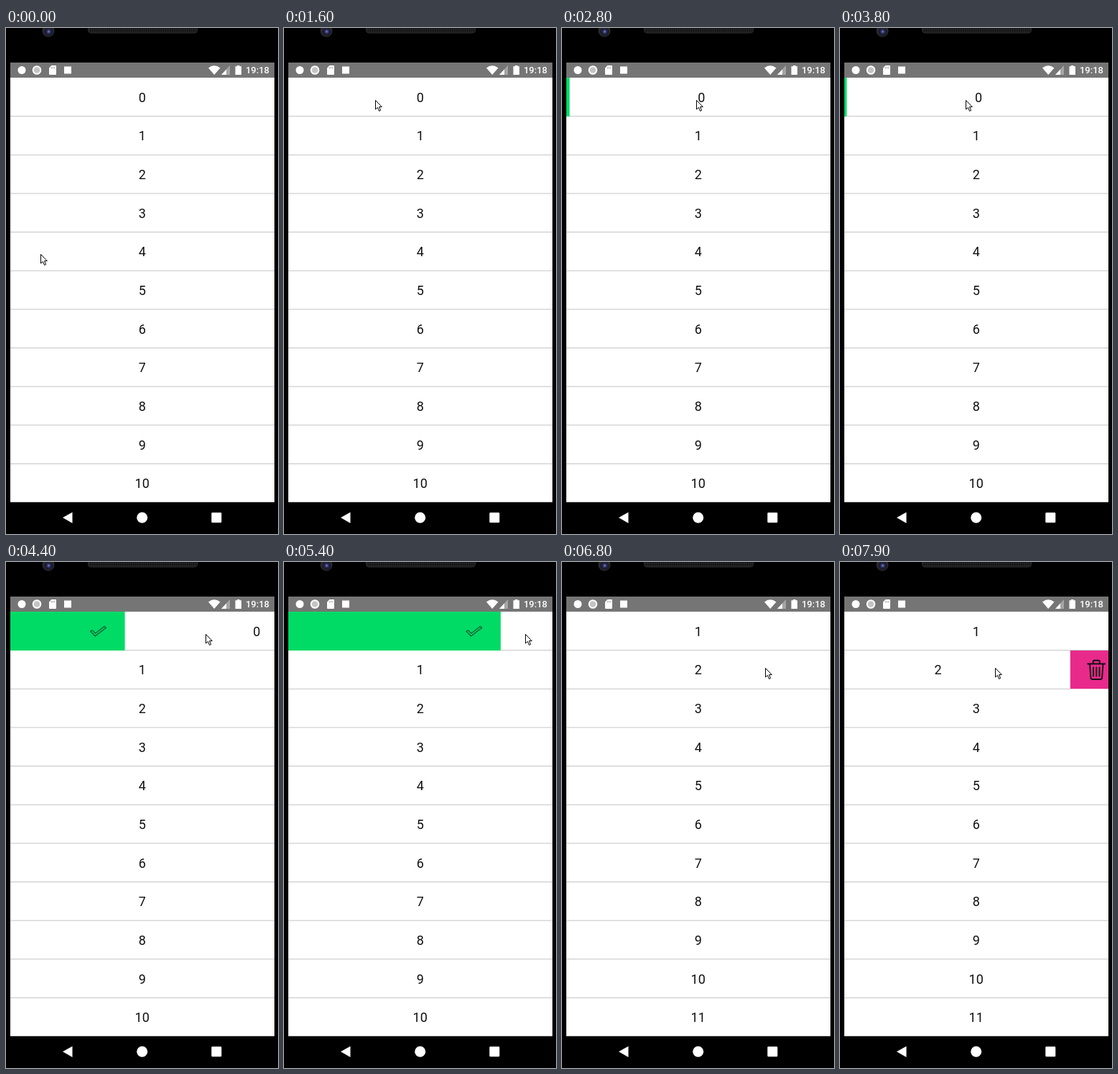
These frames come from a looping animation (379x703 px, 8 s). An HTML page:

```html
<!DOCTYPE html>
<html lang="en">
<head>
<meta charset="utf-8">
<title>Swipe list</title>
<style>
  html, body { margin: 0; width: 100%; height: 100%; overflow: hidden; background: #000; }
  svg { display: block; width: 379px; height: 703px; }
  text { font-family: Roboto, Arial, sans-serif; }
  .row text { font-size: 18px; text-anchor: middle; fill: #111; }
  .clock { font-size: 13px; font-weight: 500; fill: #fff; text-anchor: end; }
</style>
</head>
<body>
<svg viewBox="0 0 379 703">
  <defs>
    <clipPath id="screen"><rect x="6" y="69" width="368" height="589.7"/></clipPath>
    <pattern id="mesh" width="3" height="3" patternUnits="userSpaceOnUse">
      <rect width="3" height="3" fill="#222"/>
      <rect width="1.5" height="1.5" fill="#0a0a0a"/>
    </pattern>
    <radialGradient id="lens">
      <stop offset="0" stop-color="#8088d4"/>
      <stop offset=".4" stop-color="#2a2c5c"/>
      <stop offset="1" stop-color="#121218"/>
    </radialGradient>
  </defs>

  <rect width="379" height="703"/>
  <circle cx="59" cy="4" r="8.5" fill="#2a2a2d"/>
  <circle cx="59.5" cy="5" r="6" fill="url(#lens)"/>
  <rect x="114.5" y="-6" width="152" height="13" rx="4" fill="url(#mesh)" stroke="#2c2c2c"/>

  <rect x="6" y="48" width="368" height="21" fill="#757575"/>
  <g fill="#fff">
    <circle cx="22" cy="58.5" r="5.5"/>
    <circle cx="43" cy="58.5" r="5.3" fill="#c4c4c4" stroke="#fff" stroke-width="2"/>
    <path d="M63.5 52H69a1 1 0 0 1 1 1V64a1 1 0 0 1-1 1H61a1 1 0 0 1-1-1V55.5Z"/>
    <path d="M63.5 54v2.5M65.5 54v2.5M67.5 54v2.5" stroke="#999" stroke-width=".8"/>
    <rect x="81" y="53.5" width="10" height="10"/>
    <path d="M282 55.5Q290 49 298.5 55.5L290.2 65Z"/>
    <path d="M312 52V65H300Z" fill="#a5a5a5"/>
    <path d="M307 57.5V65H300Z"/>
    <path d="M322 52h3.5v1.3H328V65H319.5V53.3H322Z"/>
  </g>
  <text class="clock" x="367" y="63">19:18</text>

  <g clip-path="url(#screen)">
    <rect x="6" y="69" width="368" height="590" fill="#fff"/>
    <g id="list"></g>
    <g id="done">
      <rect x="-362" y="69" width="368" height="54" fill="#00db66"/>
      <path d="M-41.8 96.3l2.6-1.5 4.1 4.3 12.8-9.8 2.2 2-15.3 11.7Z"
            fill="none" stroke="#064f29" stroke-width="1.1" stroke-linejoin="round"/>
    </g>
    <g id="trash">
      <rect x="374" y="123" width="368" height="53.2" fill="#e82a8b"/>
      <g fill="none" stroke="#111" stroke-width="1.9" stroke-linecap="round">
        <path d="M398.5 141.5h24M406 141v-2.5q0-1.7 1.7-1.7h5.6q1.7 0 1.7 1.7v2.5"/>
        <path d="M401.3 142l1.3 18.5q.2 2.5 2.7 2.5h10.4q2.500 0 2.7-2.5l1.3-18.5"/>
        <path d="M406.3 146.5v12M410.5 146.5v12M414.7 146.5v12"/>
      </g>
    </g>
  </g>

  <g fill="#fff">
    <path d="M79 680.3L92.5 672.8V688Z"/>
    <circle cx="189.700" cy="680.3" r="7.5"/>
    <rect x="286.3" y="673.3" width="14" height="14" rx="1.2"/>
  </g>
  <path id="cursor" d="M.5.5V13L3.5 10.4 5.5 15.400 7.600 14.500 5.600 9.600H9.300Z"
        fill="#fff" stroke="#000" stroke-linejoin="round"/>
</svg>

<script>
const LOOP = 8000, STEP = 100;
const FIRST_Y = 69, PITCH = 53.64, ROWS = 11, WIDTH = 368;
const GAIN = 1.52;                      // row travel per pixel of pointer travel
const RELEASE = 5100, OPEN = 5700, REMOVED = 5900;

// Pointer moves: it rests between them.
const home = { x: 48, y: 314 };
const moves = [
  { from: 0, to: 600, x: 145, y: 107 },
  { from: 800, to: 1000, x: 127, y: 100 },
  { from: 1600, to: 2200, x: 242, y: 100 },
  { from: 2700, to: 2800, x: 187, y: 100 },
  { from: 2800, to: 3200, x: 141, y: 100 },
  { from: 3600, to: 4400, x: 278, y: 100 },
  { from: 4400, to: 4900, x: 336, y: 100 },
  { from: 5900, to: 6300, x: 288, y: 128 },
  { from: 6600, to: 6800, x: 283, y: 147 },
  { from: 7200, to: 7900, x: 216, y: 147 }
];

const byId = id => document.getElementById(id);
const list = byId('list'), cursor = byId('cursor');
const done = byId('done'), trash = byId('trash');

const mix = (a, b, k) => a + (b - a) * k;
const progress = (t, from, to) => Math.min(1, Math.max(0, (t - from) / (to - from)));
const shift = (el, x, y = 0) => el.setAttribute('transform', `translate(${x} ${y})`);

function add(parent, tag, attrs) {
  const el = document.createElementNS('http://www.w3.org/2000/svg', tag);
  for (const key in attrs) el.setAttribute(key, attrs[key]);
  return parent.appendChild(el);
}

function pointerAt(t) {
  return moves.reduce((p, m) => {
    const k = progress(t, m.from, m.to);
    return { x: mix(p.x, m.x, k), y: mix(p.y, m.y, k) };
  }, home);
}

// The row follows the pointer past a threshold, then slides open on release.
function dragAt(t, x) {
  if (t >= REMOVED) return t > 7200 ? Math.min(0, GAIN * (x - 251)) : 0;
  const origin = t < 3400 ? 184 : 173;
  const pulled = Math.max(0, GAIN * (x - origin));
  return mix(pulled, WIDTH, progress(t, RELEASE, OPEN) ** 1.32);
}

const rows = Array.from({ length: ROWS }, (_, i) => {
  const y = FIRST_Y + PITCH * i;
  const group = add(list, 'g', { class: 'row' });
  const label = add(group, 'text', { x: 189.7, y: Math.round(y + 33.8) });
  add(group, 'rect', { x: 6, y: y + 53.2, width: WIDTH, height: 0.9, fill: '#bebebe' });
  return { group, label };
});

function draw(now) {
  const t = Math.floor(now % LOOP / STEP) * STEP;
  const first = t >= REMOVED ? 1 : 0;
  const { x, y } = pointerAt(t);
  const dx = dragAt(t, x);
  rows.forEach((row, i) => {
    row.label.textContent = i + first;
    shift(row.group, i === first ? dx : 0);
  });
  shift(done, Math.max(dx, 0));
  shift(trash, Math.min(dx, 0));
  shift(cursor, Math.round(x), Math.round(y));
}

const start = performance.now();
function tick() {
  draw(performance.now() - start);
  requestAnimationFrame(tick);
}
tick();
</script>
</body>
</html>
```
